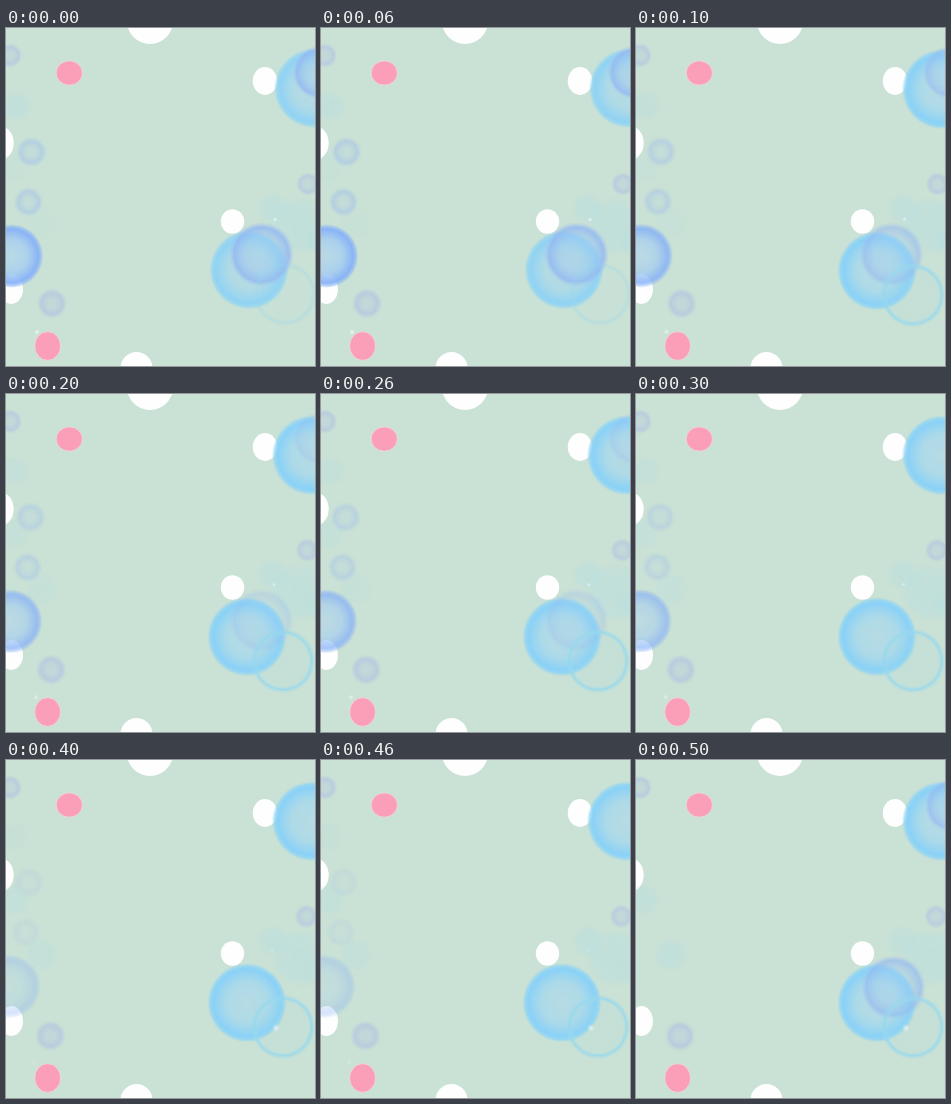
These frames come from a looping animation (309 px wide and 338 px high, 0.6 s). An HTML page:

```html
<!DOCTYPE html>
<html lang="en">
<head>
<meta charset="utf-8">
<title>Bubbles</title>
<style>
html, body { margin: 0; width: 100%; height: 100%; overflow: hidden; background: #cae1d5; }
svg { display: block; width: 100vw; height: 100vh; }

/* Six poses of 100 ms each */
.fade, .pulse, .settle, .gather, .slide, .late { animation: .6s step-end infinite; }
.fade { animation-name: fade; }
.pulse { animation-name: pulse; }
.settle { animation-name: settle; }
.late { animation-name: late; }
.gather { animation-name: gather; animation-timing-function: steps(6, jump-none); }
.slide { animation-name: slide; animation-timing-function: steps(6, jump-none); }

@keyframes fade {
  0% { opacity: 1; transform: none; animation-timing-function: steps(3); }
  50% { opacity: .7; transform: translate(-1.5px, -1px); animation-timing-function: steps(3, jump-none); }
  100% { opacity: 0; transform: translate(-4px, -2px); }
}
@keyframes pulse {
  0% { opacity: 1; transform: none; animation-timing-function: steps(3); }
  50% { opacity: 0; transform: none; }
  83.33%, 100% { opacity: .8; transform: translate(2px, 1px); }
}
@keyframes settle {
  0% { opacity: var(--start, .9); transform: translate(2px, -1px); }
  16.66%, 100% { opacity: 1; transform: none; }
}
@keyframes gather { from { opacity: .3; } to { opacity: 1; } }
@keyframes slide { to { transform: translate(-2px, .5px); } }
@keyframes late { 0% { opacity: 0; } 66.66%, 100% { opacity: .8; } }
</style>
</head>
<body>
<svg viewBox="0 0 309 338" preserveAspectRatio="none">
  <defs>
    <radialGradient id="cyan">
      <stop offset="0" stop-color="#b0d9e8" stop-opacity=".75"/>
      <stop offset=".5" stop-color="#a6d8ec" stop-opacity=".8"/>
      <stop offset=".85" stop-color="#86d0f9" stop-opacity=".95"/>
      <stop offset=".93" stop-color="#8bd3f6" stop-opacity=".75"/>
      <stop offset="1" stop-color="#9adaf0" stop-opacity="0"/>
    </radialGradient>
    <radialGradient id="blue">
      <stop offset="0" stop-color="#b4d7ea" stop-opacity=".75"/>
      <stop offset=".5" stop-color="#a5cdf0" stop-opacity=".8"/>
      <stop offset=".84" stop-color="#83aff9" stop-opacity=".92"/>
      <stop offset=".93" stop-color="#90b8f5" stop-opacity=".65"/>
      <stop offset="1" stop-color="#9cc4ee" stop-opacity="0"/>
    </radialGradient>
    <radialGradient id="veil">
      <stop offset="0" stop-color="#a9d0ee" stop-opacity=".35"/>
      <stop offset=".5" stop-color="#9fc8f0" stop-opacity=".45"/>
      <stop offset=".84" stop-color="#92b9f1" stop-opacity=".85"/>
      <stop offset="1" stop-color="#a8c5ec" stop-opacity="0"/>
    </radialGradient>
    <radialGradient id="hoop">
      <stop offset=".78" stop-color="#a6dde6" stop-opacity=".12"/>
      <stop offset=".88" stop-color="#94d7ee" stop-opacity=".8"/>
      <stop offset="1" stop-color="#a4dde8" stop-opacity="0"/>
    </radialGradient>
    <radialGradient id="loop">
      <stop offset=".2" stop-color="#b9d6de" stop-opacity=".35"/>
      <stop offset=".7" stop-color="#aecae4" stop-opacity=".8"/>
      <stop offset="1" stop-color="#b8d5de" stop-opacity="0"/>
    </radialGradient>
    <radialGradient id="lilac">
      <stop offset=".2" stop-color="#b8cede" stop-opacity=".45"/>
      <stop offset=".7" stop-color="#b2c3e1" stop-opacity=".8"/>
      <stop offset="1" stop-color="#bad0de" stop-opacity="0"/>
    </radialGradient>
    <radialGradient id="mist">
      <stop offset="0" stop-color="#b4dee2" stop-opacity=".4"/>
      <stop offset=".75" stop-color="#b6dfe2" stop-opacity=".35"/>
      <stop offset="1" stop-color="#bfe0dd" stop-opacity="0"/>
    </radialGradient>
    <radialGradient id="glint">
      <stop offset="0" stop-color="#f4fbfb" stop-opacity=".9"/>
      <stop offset="1" stop-color="#e6f3f0" stop-opacity="0"/>
    </radialGradient>
  </defs>

  <g fill="#fefefe">
    <circle cx="144" cy="-7" r="23.1"/>
    <ellipse cx="259" cy="53" rx="12.3" ry="13.9"/>
    <ellipse cx="226.5" cy="193.5" rx="11.7" ry="12.2"/>
    <ellipse cx="-6" cy="115" rx="13.7" ry="17"/>
    <ellipse cx="5.5" cy="261" rx="11.5" ry="15"/>
    <circle cx="130.5" cy="340" r="16"/>
  </g>
  <g fill="#fb9fb8" stroke="#e6e9e2" stroke-width=".7">
    <ellipse cx="63.3" cy="45" rx="13.2" ry="12.2"/>
    <ellipse cx="41.6" cy="318" rx="13" ry="14.4"/>
  </g>

  <g fill="url(#mist)">
    <circle class="gather" cx="35" cy="195" r="17"/>
    <circle class="gather" cx="8" cy="140" r="16"/>
    <circle class="fade" cx="10" cy="78" r="15"/>
    <circle cx="294" cy="198" r="30"/>
    <circle cx="267" cy="181" r="16"/>
    <circle class="fade" cx="311" cy="213" r="14"/>
  </g>

  <g fill="url(#lilac)">
    <circle cx="4" cy="27.5" r="12.5" fill-opacity=".85"/>
    <circle class="slide" cx="302" cy="156" r="12" fill-opacity=".85"/>
    <circle class="slide" cx="46" cy="275.5" r="15.5" fill-opacity=".9"/>
  </g>
  <g fill="url(#loop)">
    <circle class="fade" cx="25.5" cy="124" r="15.5"/>
    <circle class="fade" cx="22.5" cy="174" r="15"/>
  </g>
  <circle class="fade" cx="5.5" cy="228" r="32" fill="url(#blue)"/>

  <g fill="url(#cyan)">
    <circle class="settle" cx="305.8" cy="61.3" r="40"/>
    <circle class="settle" cx="241" cy="242.8" r="39.7"/>
  </g>
  <g fill="url(#veil)">
    <circle class="pulse" cx="313.5" cy="44.5" r="27"/>
    <circle class="pulse" cx="255.5" cy="226.5" r="32.5"/>
  </g>
  <circle class="settle" cx="277" cy="267" r="32.5" fill="url(#hoop)" style="--start: .4"/>

  <g fill="url(#glint)">
    <circle class="fade" cx="269" cy="191.5" r="2.5"/>
    <circle class="fade" cx="31" cy="304" r="3"/>
    <circle class="late" cx="270" cy="268" r="4"/>
  </g>
</svg>
</body>
</html>
```
